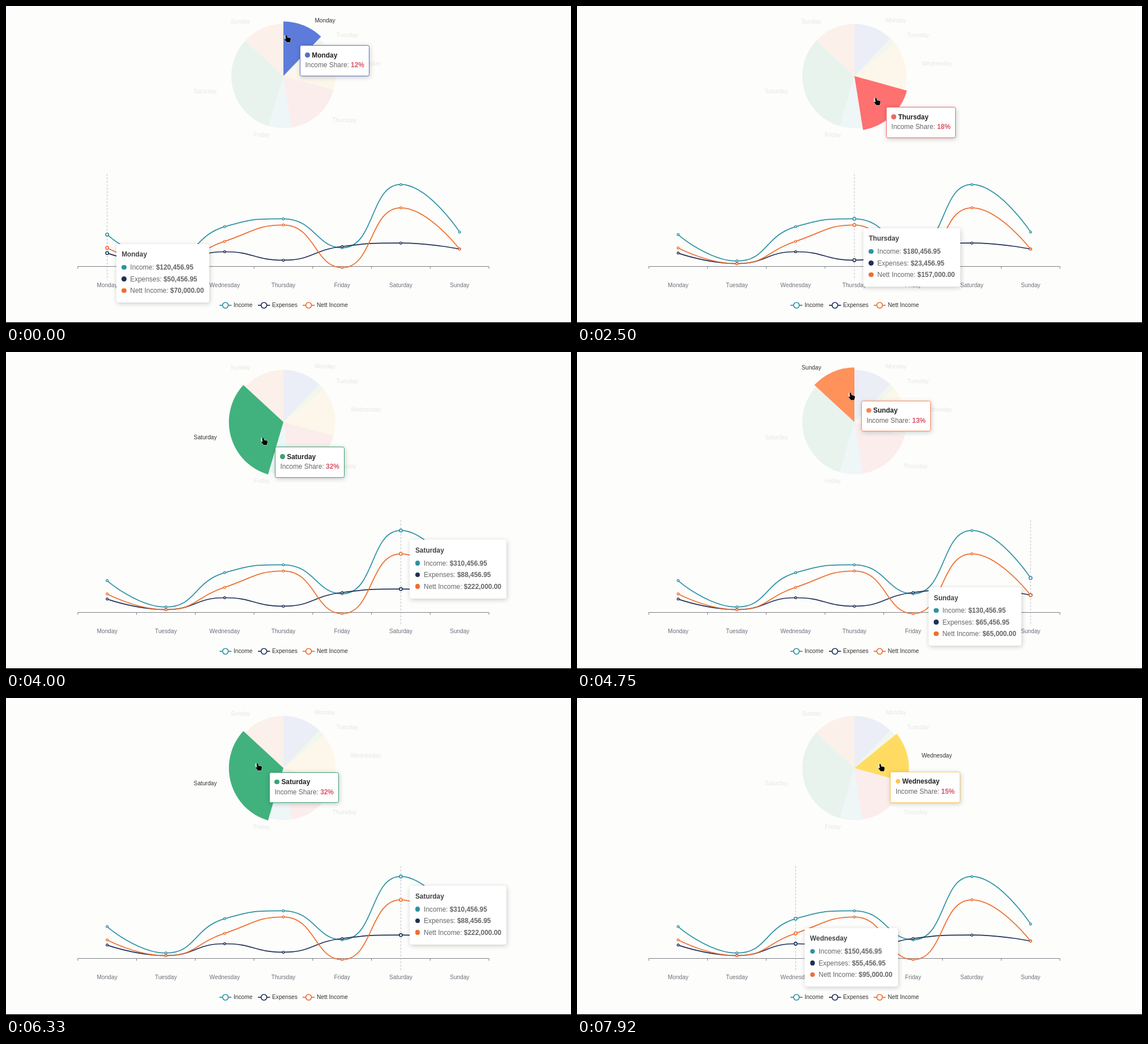
These frames come from a looping animation (998 by 561 pixels, 8000 ms). An HTML page:

```html
<!DOCTYPE html>
<html lang="en">
<head>
<meta charset="utf-8">
<title>Weekly income</title>
<style>
html, body { margin: 0; width: 100%; height: 100%; overflow: hidden; background: #fdfdfc; }
body { position: relative; font-family: "Liberation Sans", Arial, sans-serif; }
svg { position: absolute; left: 0; top: 0; }
svg text { font-size: 10.2px; dominant-baseline: central; }
.tip {
  position: absolute; box-sizing: border-box; padding: 8.5px; white-space: nowrap;
  border: .85px solid #fff; border-radius: 3.4px; background: #fff; color: #666;
  font-size: 11.9px; line-height: 17.85px; box-shadow: 1px 2px 8.5px rgba(0, 0, 0, .2);
}
.tip i {
  display: inline-block; width: 8.5px; height: 8.5px; margin-right: 3.4px; border-radius: 50%;
}
.tip .title { color: #222; font-weight: bold; }
#share b { color: #dc5565; }
#detail { padding-bottom: 9.5px; }
#detail .title { color: #444; line-height: 19px; margin-bottom: 2.9px; }
#detail .row { line-height: 20.4px; }
</style>
</head>
<body>
<svg id="scene" width="998" height="561" viewBox="0 0 998 561"></svg>
<div id="detail" class="tip"></div>
<div id="share" class="tip"></div>
<svg width="998" height="561" viewBox="0 0 998 561">
  <path id="hand" fill="#000" stroke="#fff" stroke-width=".8" stroke-linejoin="round" paint-order="stroke"
    d="M-1.3 1.2Q0-.8 1.4 1L2 4.4 6.5 5.2Q8.3 5.7 8 8L7 12Q6.8 13 6 13H1.6Q.8 13 .3 12L-2.6 8.6Q-3-7 -2.6 7Q-1.6 6.6-.3 8Z"/>
</svg>
<script>
const LOOP = 8000;
const CENTER = [490, 123.6], RADIUS = 92, GROWTH = 4.3;
const AXIS_Y = 459.3, AXIS_LEFT = 126.8, BAND = 103.75, PER_PIXEL = 2151;
const VIEW_WIDTH = 980, VIEW_BOTTOM = 540;

// name, share, colour, label x, label y, income, expenses
const days = [
  ['Monday', 12, '#5470c6', 563.5, 25, 120456.95, 50456.95],
  ['Tuesday', 2, '#91cc75', 602.5, 51, 20456.95, 10456.95],
  ['Wednesday', 15, '#fac858', 635.5, 101, 150456.95, 55456.95],
  ['Thursday', 18, '#ee6666', 598, 201, 180456.95, 23456.95],
  ['Friday', 7, '#73c0de', 452, 227, 70456.95, 75456.95],
  ['Saturday', 32, '#3ba272', 352, 150, 310456.95, 88456.95],
  ['Sunday', 13, '#fc8452', 414, 27, 130456.95, 65456.95]
].map(([name, share, color, labelX, labelY, income, expenses], i) => ({
  name, share, color, labelX, labelY,
  x: AXIS_LEFT + BAND * (i + .5),
  values: [income, expenses, income - expenses]
}));

const series = [
  { name: 'Income', color: '#2d93a2', legendX: 377 },
  { name: 'Expenses', color: '#1f2f56', legendX: 445 },
  { name: 'Nett Income', color: '#ee6f30', legendX: 524 }
];

// Pointer sweep: time, clockwise degrees, radius, tooltip offset x, y
const sweep = [
  [0, 3.9, 72.7, 24, 18],
  [1285, 50.9, 74, 14, 7],
  [1420, 72.2, 73.5, 13, 5],
  [1600, 84, 71, 19, 15],
  [2500, 135.4, 54, 18, 16],
  [4000, 232.6, 45.3, 21, 16],
  [4450, 313, 50, 20, 15],
  [5080, 395, 55, 18, 13],
  [5220, 466, 46, 18, 13],
  [5500, 494.4, 36.4, 18, 14],
  [6330, 640.5, 46.8, 21, 15.5],
  [6780, 673, 50, 20, 15],
  [7500, 750, 52, 18, 13],
  [7600, 771.5, 50, 17, 12],
  [8000, 808, 45, 18, 14]
];

const $ = id => document.getElementById(id);
const scene = $('scene'), share = $('share'), detail = $('detail');
const lerp = (a, b, p) => a + (b - a) * p;
const clamp = (v, a, b) => Math.max(Math.min(a, b), Math.min(v, Math.max(a, b)));
const easeOut = power => p => 1 - (1 - Math.min(p, 1)) ** power;
const valueY = v => AXIS_Y - v / PER_PIXEL;

function add(tag, attrs, text) {
  const el = document.createElementNS('http://www.w3.org/2000/svg', tag);
  for (const key in attrs) el.setAttribute(key, attrs[key]);
  if (text) el.textContent = text;
  return scene.appendChild(el);
}

function polar(degrees, r) {
  const a = degrees * Math.PI / 180;
  return [CENTER[0] + r * Math.sin(a), CENTER[1] - r * Math.cos(a)];
}

function money(v) {
  const text = Math.abs(v).toLocaleString('en-US', { minimumFractionDigits: 2, maximumFractionDigits: 2 });
  return (v < 0 ? '-$' : '$') + text;
}

// Bezier handles that never overshoot the neighbouring points
function smoothPath(points) {
  let d = `M${points[0]}`, out = points[0];
  for (let i = 1; i < points.length; i++) {
    const prev = points[i - 1], p = points[i], next = points[i + 1];
    let into = p, nextOut = p;
    if (next) {
      const before = Math.hypot(p[0] - prev[0], p[1] - prev[1]);
      const after = Math.hypot(next[0] - p[0], next[1] - p[1]);
      const ratio = after / (after + before);
      into = p.map((v, k) => {
        const ahead = clamp(v + (next[k] - prev[k]) * .5 * ratio, next[k], v);
        return clamp(v - (ahead - v) * before / after, prev[k], v);
      });
      nextOut = p.map((v, k) => v + (v - into[k]) * after / before);
    }
    d += `C${out} ${into} ${p}`;
    out = nextOut;
  }
  return d;
}

// Pie
const totalShare = days.reduce((sum, d) => sum + d.share, 0);
let angle = 0;
for (const d of days) {
  d.from = angle;
  d.to = angle += d.share / totalShare * 360;
  d.slice = add('path', { fill: d.color });
}
for (const d of days) {
  d.label = add('text', { x: d.labelX, y: d.labelY, 'text-anchor': 'middle', fill: '#333' }, d.name);
}

// Line chart
const axisRight = AXIS_LEFT + BAND * 7;
let axis = `M${AXIS_LEFT} 459.5H${axisRight}`;
for (let i = 0; i <= 7; i++) axis += `M${AXIS_LEFT + BAND * i} 459.5v4`;
add('path', { d: axis, stroke: '#6e7079', 'stroke-width': .9, fill: 'none' });
for (const d of days) {
  add('text', { x: d.x, y: 492.5, 'text-anchor': 'middle', fill: '#6e7079' }, d.name);
}
const guide = add('line', { y1: 296.5, y2: 483, stroke: '#b4b7c2', 'stroke-width': .9, 'stroke-dasharray': '3.4 2.6' });

series.forEach((s, k) => {
  const points = days.map(d => [d.x, valueY(d.values[k])]);
  add('path', { d: smoothPath(points), fill: 'none', stroke: s.color, 'stroke-width': 1.7, 'stroke-linejoin': 'bevel' });
  s.dots = points.map(([cx, cy]) => add('circle', { cx, cy, fill: '#fff', stroke: s.color }));

  add('path', { d: `M${s.legendX} 528h21.3`, stroke: s.color, 'stroke-width': 1.7 });
  add('circle', { cx: s.legendX + 10.6, cy: 528, r: 5, fill: '#fff', stroke: s.color, 'stroke-width': 1.7 });
  add('text', { x: s.legendX + 25, y: 527.5, fill: '#333' }, s.name);
});
add('rect', { y: 558, width: 998, height: 3, fill: '#000' });

// Tooltips
const marker = color => `<i style="background:${color}"></i>`;
const shareHtml = d => `<div class="title">${marker(d.color)}${d.name}</div>Income Share: <b>${d.share}%</b>`;
const detailHtml = d => `<div class="title">${d.name}</div>` + series.map((s, k) =>
  `<div class="row">${marker(s.color)} ${s.name}: <b>${money(d.values[k])}</b></div>`).join('');

for (const d of days) {
  detail.innerHTML = detailHtml(d);
  const { width, height } = detail.getBoundingClientRect();
  const y = valueY(d.values[0]);
  d.tip = [
    d.x + 18 + width > VIEW_WIDTH ? d.x - 16 - width : d.x + 16,
    y + 16.5 + height > VIEW_BOTTOM ? y - 16.5 - height : y + 16.5
  ];
}

function sweepAt(t) {
  const i = Math.max(1, sweep.findIndex(row => row[0] >= t));
  const a = sweep[i - 1], b = sweep[i];
  const p = (t - a[0]) / (b[0] - a[0]);
  return a.map((v, k) => lerp(v, b[k], p));
}
const dayAt = t => {
  const turn = sweepAt(t)[1] % 360;
  return days.find(d => turn < d.to) || days[6];
};

const visits = [{ start: -1000, day: dayAt(0) }];
for (let t = 0; t < LOOP; t += 5) {
  const day = dayAt(t);
  if (day !== visits[visits.length - 1].day) visits.push({ start: t, day });
}

// Value that eases toward each visited day's target in turn
function chase(target, t, duration, ease) {
  let v = target(visits[0].day);
  for (let i = 1; i < visits.length && visits[i].start <= t; i++) {
    const end = Math.min(t, visits[i + 1] ? visits[i + 1].start : LOOP);
    v = lerp(v, target(visits[i].day), ease((end - visits[i].start) / duration));
  }
  return v;
}

let shown;
function render(t) {
  const [, turn, radius, dx, dy] = sweepAt(t);
  const [px, py] = polar(turn, radius);
  const current = visits.filter(v => v.start <= t).pop().day;

  if (current !== shown) {
    shown = current;
    share.innerHTML = shareHtml(current);
    share.style.borderColor = current.color;
    detail.innerHTML = detailHtml(current);
  }
  $('hand').setAttribute('transform', `translate(${px} ${py})`);
  share.style.left = px + dx + 'px';
  share.style.top = py + dy + 'px';
  detail.style.left = chase(d => d.tip[0], t, 400, easeOut(5)) + 'px';
  detail.style.top = chase(d => d.tip[1], t, 400, easeOut(5)) + 'px';

  const guideX = chase(d => d.x, t, 200, easeOut(5));
  guide.setAttribute('x1', guideX);
  guide.setAttribute('x2', guideX);

  days.forEach((day, i) => {
    const focus = chase(d => +(d === day), t, 300, easeOut(3));
    const r = RADIUS + GROWTH * focus;
    const large = day.to - day.from > 180 ? 1 : 0;
    day.slice.setAttribute('d', `M${CENTER}L${polar(day.from, r)}A${r} ${r} 0 ${large} 1 ${polar(day.to, r)}Z`);
    day.slice.style.opacity = lerp(.1, 1, focus);
    day.slice.style.filter = `brightness(${1 + .1 * focus})`;
    day.label.style.opacity = lerp(.11, 1, focus);
    for (const s of series) {
      s.dots[i].setAttribute('r', lerp(1.8, 2.6, focus));
      s.dots[i].setAttribute('stroke-width', lerp(1.4, 1.6, focus));
    }
  });
}

const begin = performance.now();
function tick() {
  render((performance.now() - begin) % LOOP);
  requestAnimationFrame(tick);
}
tick();
</script>
</body>
</html>
```
